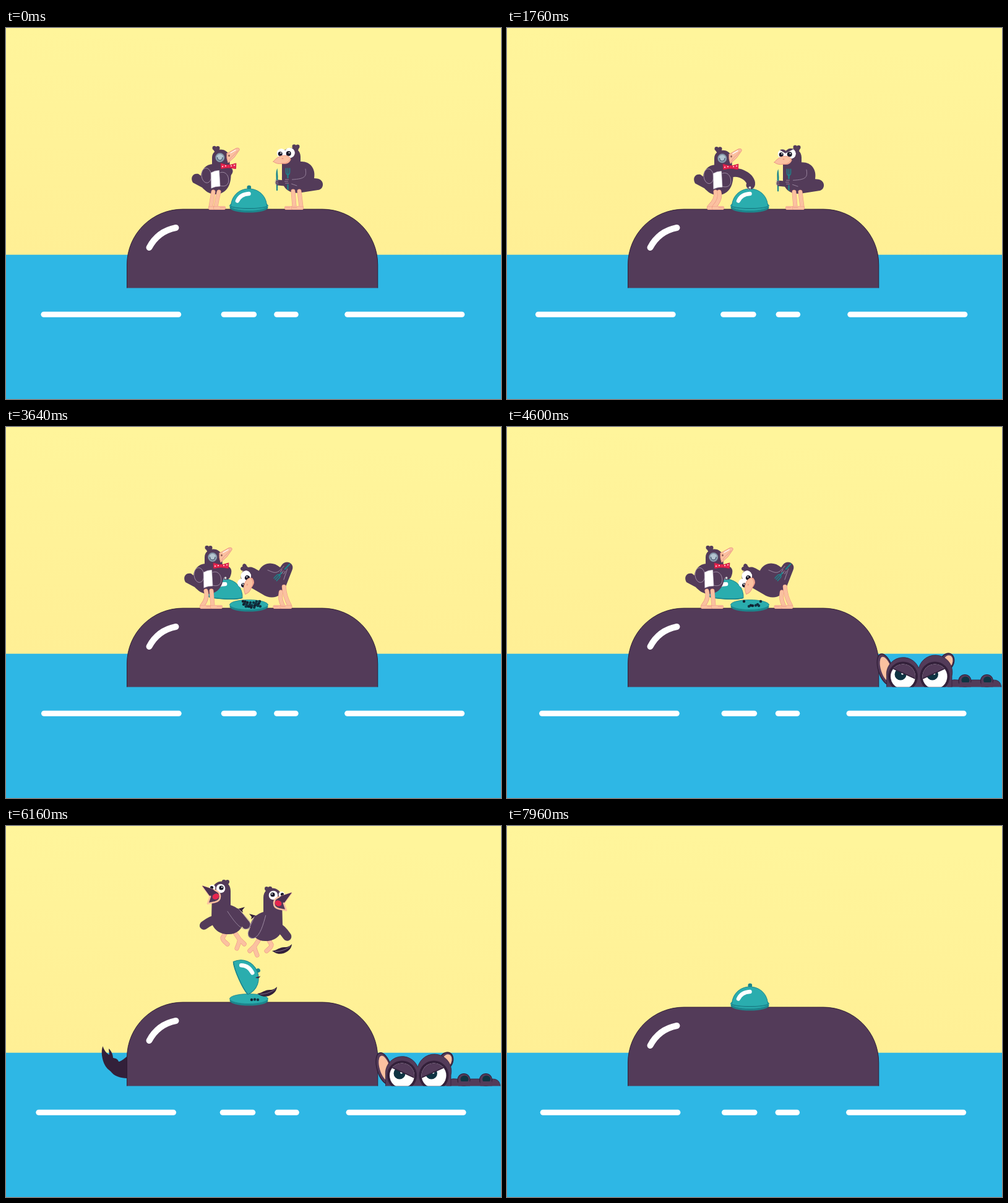
Recreate the animation shown at these times as an HTML page with a canvas. Size 800 by 600 pixels, loop 8000 ms.

```html
<!DOCTYPE html>
<html lang="en">
<head>
<meta charset="utf-8">
<title>Dinner on the island</title>
<style>
html, body { margin: 0; width: 100%; height: 100%; overflow: hidden; }
canvas { display: block; width: 800px; height: 600px; }
</style>
</head>
<body>
<canvas id="stage" width="800" height="600"></canvas>
<script>
const ctx = document.getElementById('stage').getContext('2d');
const LOOP = 8000, TAU = Math.PI * 2;
const PLUM = '#533b59', DARK = '#33203a', SKIN = '#fbc1a0', SKIN_EDGE = '#ec9a86';
const TEAL = '#2aadae', DEEP = '#1c858c', NAVY = '#0f3342', LINE = '#a795ac';
const WATERLINE = 420.5;
let t = 0;

const lerp = (a, b, k) => a + (b - a) * k;
const ramp = (a, b) => Math.min(1, Math.max(0, (t - a) / (b - a)));
const ease = (a, b) => { const k = ramp(a, b); return k * k * (3 - 2 * k); };
const easeOut = (a, b) => 1 - Math.pow(1 - ramp(a, b), 3);

function fill(d, color, edge, width = 0.8) {
  const p = new Path2D(d);
  ctx.fillStyle = color;
  ctx.fill(p);
  if (edge) { ctx.strokeStyle = edge; ctx.lineWidth = width; ctx.stroke(p); }
}
function line(d, color, width) {
  ctx.strokeStyle = color;
  ctx.lineWidth = width;
  ctx.stroke(new Path2D(d));
}
function edged(d, width) {
  line(d, SKIN_EDGE, width + 1.2);
  line(d, SKIN, width);
}
function oval(x, y, rx, ry, color, edge, width = 0.8, turn = 0) {
  ctx.beginPath();
  ctx.ellipse(x, y, rx, ry, turn, 0, TAU);
  ctx.fillStyle = color;
  ctx.fill();
  if (edge) { ctx.strokeStyle = edge; ctx.lineWidth = width; ctx.stroke(); }
}
const dot = (x, y, r, color, edge, width) => oval(x, y, r, r, color, edge, width);
function at(x, y, turn, draw) {
  ctx.save();
  ctx.translate(x, y);
  ctx.rotate(turn * Math.PI / 180);
  draw();
  ctx.restore();
}
function inCircle(x, y, r, draw) {
  ctx.save();
  ctx.beginPath();
  ctx.arc(x, y, r, 0, TAU);
  ctx.clip();
  draw();
  ctx.restore();
}

function backdrop() {
  const g = ctx.createLinearGradient(20, 0, 0, 367);
  g.addColorStop(0, '#fff59b');
  g.addColorStop(1, '#ffef95');
  ctx.fillStyle = g;
  ctx.fillRect(0, 0, 800, 367);
  ctx.fillStyle = '#2eb7e5';
  ctx.fillRect(0, 366.7, 800, 234);
}

function waves() {
  const s = Math.cos(TAU * (t - 280) / 3520);
  const bar = (x, w) => line(`M${x + 4.5},463.3 H${x + w - 4.5}`, '#fff', 9);
  bar(51.2 + 6 * s, 226.7);
  bar(346.4 + 1.4 * s, 57.5);
  bar(433.9 - 0.8 * s, 39.5);
  bar(548.8 - 1.7 * s, 194);
}

function hippoTail() {
  if (t > 5250 && t < 5900) {
    const up = 1 - easeOut(5250, 5620), swing = ease(5740, 5900);
    ctx.save();
    ctx.translate(60 * up, 80 * up);
    at(240, 350, -50 * swing, () => {
      ctx.translate(-240, -350);
      fill('M190,322 C184,300 205,285 222,285 C238,285 248,291 254,303 L236,312 C224,313 216,321 212,330Z', PLUM, DARK);
      fill('M213,319 C205,313 192,314 186,322 C178,332 174,342 177,350 L182,346 C181,354 184,361 187,362 L190,357 C189,366 192,374 197,380 L205,345Z', DARK);
    });
    ctx.restore();
  }
  if (t >= 5900 && t < 6650) {
    const out = ease(6300, 6600);
    ctx.save();
    ctx.translate(50 * out, 8 * out);
    fill('M199,370 C193,374 187,381 182,381 C180,376 177,376 173,375 C173,370 170,363 166,360 L167,370 C161,367 158,361 156.500,356 C153,364 155,378 160,387 C163,393 168,395 171,399 C178,407 190,408 199,408Z', DARK);
    ctx.restore();
  }
}

function island() {
  fill('M195.500,440 V383 C195.500,333 236,293 286,293 H511 C561,293 600.800,333 600.800,383 V440Z', PLUM, '#2b1a30', 0.9);
  line('M231.500,355 C240,339 254,327 274.500,323', '#fff', 10);
}

function ear(x, y, rx, ry, turn) {
  at(x, y, turn, () => {
    oval(0, 0, rx, ry, PLUM, DARK, 1.5);
    oval(1, 0, rx * 0.72, ry * 0.8, SKIN);
  });
}

function hippoEye(x, side) {
  dot(x, 403.5, 24, DARK);
  inCircle(x, 403.5, 20, () => {
    ctx.fillStyle = '#fff';
    ctx.fillRect(x - 22, 380, 44, 46);
    dot(x - 4, 400, 9.5, NAVY);
    dot(x - 1, 399, 1.8, '#fff');
    fill(`M${x - side * 24},387 L${x + side * 24},409 V375 H${x - side * 24}Z`, PLUM, DARK, 1.5);
  });
}

function hippo() {
  if (t < 4240 || t > 7400) return;
  const sink = 1 - easeOut(4240, 4560) + ease(6950, 7380);
  const twitch = Math.sin(t / 150);
  ctx.save();
  ctx.translate(0, 62 * sink);
  ear(611 - twitch, 392, 11.5, 26, -16 + twitch * 2);
  ear(711, 380, 11, 14.5, 24 + twitch * 2);
  fill('M706,440 L716,411 C722,407 728,410 736,409 H785 C795,409 799,413 799,425 V440Z', PLUM, DARK);
  for (const x of [740, 775.5]) {
    dot(x, 410.500, 10, PLUM, DARK, 1.2);
    oval(x + 1, 409.500, 6.5, 6, NAVY);
    fill(`M${x - 9},413 H${x + 10} V424 H${x - 9}Z`, PLUM);
  }
  fill('M613.500,440 V403 A27,27 0 0 1 665.500,390 A27,27 0 0 1 719,403 V440Z', PLUM, DARK);
  hippoEye(640, 1);
  hippoEye(691.5, -1);
  ctx.restore();
}

function plate() {
  oval(392.5, 290.5, 31, 8, DEEP);
  oval(392.5, 287.5, 31, 8, TEAL, DEEP, 0.8);
}

const LEFTOVERS = [[397, 289], [402, 288.5], [407, 289], [383, 282], [410, 282], [391, 290], [394, 288.5], [405, 287]];
function food() {
  const left = t < 4120 ? 28 : t < 4920 ? 8 : t < 5720 ? 5 : 3;
  for (let i = 0; i < left; i++) {
    const p = LEFTOVERS[i] || [383 + (i * 7.3) % 28, 281 + (i * 4.7) % 11];
    dot(p[0], p[1], 2.2, i % 3 ? NAVY : '#14202f');
  }
}

function lidPose() {
  if (t < 5880) {
    const k = ease(1800, 2500);
    return { x: lerp(392.5, 353, k), y: lerp(289, 275, k) - 22 * Math.sin(Math.PI * k), a: 3 * k };
  }
  if (t < 6160) {
    const k = ramp(5880, 6160);
    return { x: lerp(353, 379, k), y: lerp(275, 246, k) - 45 * Math.sin(Math.PI * k), a: lerp(3, 66, k) };
  }
  const k = ramp(6160, 6480), d = k * k;
  return { x: lerp(379, 392.5, k), y: lerp(246, 289, d), a: 66 * (1 - d) };
}

function lid(p) {
  at(p.x, p.y, p.a, () => {
    dot(0.3, -31, 3.4, DEEP);
    fill('M-29,0 C-29,-17 -16,-29 0,-29 C16,-29 29,-17 29,0 C18,4 -18,4 -29,0Z', TEAL, DEEP, 1);
    line('M-28,0 C-16,4 16,4 28,0', DEEP, 1.5);
    line('M-18.500,-9.500 C-15,-17 -9,-20.500 0,-21', '#fff', 6.5);
  });
}

function leg(hx, hy, kx, ky, ax, dir) {
  edged(`M${hx},${hy} Q${kx},${ky} ${ax},289`, 5.8);
  edged(`M${ax - dir},291 H${ax + dir * 13}`, 5);
  line(`M${ax + dir * 7},290.500 H${ax + dir * 14}`, SKIN_EDGE, 0.8);
}

function tuft(x, y) {
  dot(x - 2.8, y, 3.2, PLUM);
  dot(x + 2.8, y + 0.3, 3.2, PLUM);
  fill(`M${x - 5},${y + 2} L${x - 1},${y + 8} H${x + 3} L${x + 5},${y + 2}Z`, PLUM);
}

function bob() {
  return 0.6 * (1 - Math.cos(TAU * t / 1173)) * (1 - ease(2000, 2500));
}

function waiter(knob) {
  const reach = ease(1250, 1650), back = ease(1850, 2500);
  const dx = lerp(2 * reach, -12, back), dy = bob() + back;
  const step = reach * (1 - back);
  const foot1 = lerp(331 - 4 * reach, 317, back), foot2 = lerp(339 - 4 * reach, 334, back);

  ctx.save();
  ctx.translate(dx, dy);
  fill('M333,224 V210 C333,192 361,192 361,210 L362,224 C366,240 364,268 339,269 C328,269 322,263 317,258 L302,250 C297,241 303,234 311,236 L315,239 C316,228 324,221 333,220Z', PLUM);
  tuft(339.5, 194);
  ctx.restore();

  const sx = 358 + dx, sy = 234 + dy;
  const hx = lerp(348, knob.x + 1, reach), hy = lerp(246, knob.y + 1, reach);
  const c1 = sx + 8 + 0.3 * (hx - sx);
  line(`M${sx},${sy} C${c1},${sy - 6} ${hx + 4},${hy - 14} ${hx},${hy - 5}`, PLUM, 14);
  if (reach > 0.5) {
    line(`M${hx - 4},${hy - 1} l1,4 M${hx},${hy - 2} l0,4`, LINE, 0.8);
    dot(knob.x, knob.y, 1.8, '#d9e3dc');
  }

  leg(335 + dx, 265, lerp(333, 327, back) + 7 * step, 277, foot1, 1);
  leg(344 + dx - 3 * step, 265, 341 + lerp(5 * reach, -8, back), 277, foot2, 1);

  ctx.save();
  ctx.translate(dx, dy);
  fill('M357,203 L372,194.500 Q378,193 377,197.500 L369,209 L359,218 Q356,211 357,203Z', SKIN, SKIN_EDGE, 1);
  line('M361,214 C363,208 369,206 374,199', SKIN_EDGE, 1);
  oval(360.5, 206.5, 1.3, 1.8, '#8c5a50');
  line('M363,202 L371,197.500', '#fff', 1.4);
  dot(345.8, 209.5, 6.5, '#b4c5d0', '#8497a8', 2);
  line('M341.500,209.500 C342,215.500 349.500,215.500 350,209.500', '#42506a', 1.3);
  fill('M347.500,219 L358,222 L358,226 L348,227.500Z', '#e8264f', '#c91b45', 1);
  fill('M371.500,219 L361,222 L361,226 L371,227.500Z', '#e8264f', '#c91b45', 1);
  dot(359.5, 223.7, 2.6, '#e8264f', '#c91b45');
  for (const x of [350, 355, 364, 369]) dot(x, 222 + x % 3, 0.9, '#fff');
  oval(324, 238.5, 8, 12, PLUM, LINE, 0.9, -0.1);
  fill('M331.500,234 Q338,230 344.500,230.500 L346,256 Q338,256 332,259Z', '#fff', '#d8d4df', 0.6);
  line('M346,234 C356,230 362,242 359,251 C356,257 349,256 346,255', LINE, 0.9);
  ctx.restore();
}

function fork(px, py, hx, hy) {
  at(px, py, Math.atan2(hy - py, hx - px) * 180 / Math.PI, () => {
    line('M10,0 H34', DEEP, 2.2);
    line('M0,-3 H6 Q10,-3 10,0 Q10,3 6,3 H0 M0,0 H9', DEEP, 1.5);
  });
}

// side: 1 for the outer eye, -1 for the inner one; brow slants a lid over it.
function guestEye(x, y, r, side, brow, look) {
  inCircle(x, y, r, () => {
    dot(x, y, r, '#fff');
    dot(x - 1.8, y + 1 + 2.5 * look, r * 0.47, '#1c1a2b');
    dot(x - 0.8, y - 0.3 + 2.5 * look, 1, '#fff');
    const top = y - r - 1;
    fill(`M${x - side * r},${top} H${x + side * r} V${top + 9 * brow}Z`, PLUM);
  });
}

function pecking() {
  if (t < 3720) return 0;
  const d = Math.abs((t - 3720) % 800 - 400);
  return d < 300 ? 0.5 + 0.5 * Math.cos(Math.PI * d / 300) : 0;
}

function guest() {
  const lean = ease(2650, 3320), peck = pecking();
  const brow = ease(900, 1300) * (1 - ease(2400, 2700));
  const angle = -60 * lean - 24 * peck;
  const px = 465 - 22 * lean - 14 * peck, py = 262 + 3 * lean - 2 * peck + bob();

  at(px, py, angle, () => {
    ctx.translate(-465, -262);
    tuft(468.5, 191.5);
    fill('M446,222 V208 C446,189 476,189 476,208 V216 C491,215 501,227 498,243 L503,243.500 C515,245 515,261 504,262 L478,266 C455,270 445,256 446,240Z', PLUM);
    guestEye(445, 202.5, 7.5, 1, brow, lean);
    guestEye(458.5, 202, 8.5, -1, brow, lean);
    fill('M432,216 Q440,206 450,206 Q460,207 460,213 Q457,221 447,219 Q438,221 432,216Z', SKIN, SKIN_EDGE, 1);
    line('M446,219 C451,220 457,217 459,212', SKIN_EDGE, 1);
    oval(447, 211, 1.6, 1, SKIN_EDGE);
    if (lean < 0.5) {
      fill('M437,263 L436.500,240 Q436,231 438.500,227 L439.500,240 L439,263Z', DEEP);
      line('M450,251 L440,250', PLUM, 9);
      line('M435,246 l5,1 M434.500,249 l5,0.500 M435,252 l5,0', LINE, 0.8);
    }
    const fx = lerp(455.5, 477, lean), fy = lerp(227, 246, lean);
    const gx = lerp(455.5, 507, lean), gy = lerp(261, 253, lean);
    const mx = lerp(fx, gx, 0.62), my = lerp(fy, gy, 0.62);
    fork(fx, fy, gx, gy);
    line(`M484,228 C486,240 484,244 ${mx + 7},${my - 3} M${mx + 6},${my + 4} L${lerp(470, mx - 12, lean)},${lerp(255, 258, lean)}`, LINE, 0.8);
    oval(mx, my, lerp(4.5, 3, lean), lerp(5, 3.5, lean), PLUM);
    line(`M${mx - 4},${my - 3} h5 M${mx - 5},${my} h5 M${mx - 4},${my + 3} h5`, LINE, 0.8);
  });

  const r = angle * Math.PI / 180, c = Math.cos(r), s = Math.sin(r);
  [[-1, 2, 466], [9, 2, 477]].forEach(([x, y, ankle]) => {
    const hx = px + x * c - y * s, hy = py + x * s + y * c, ax = ankle - 18.5 * lean;
    const bend = 4 * lean * (1 - peck);
    leg(hx, hy, (hx + ax) / 2 - bend, (hy + 289) / 2, ax, -1);
  });
}

// Startled bird, facing left, centred on its body.
function flyer(x, y, flip, phase) {
  const flap = Math.sin((t - 6160) / 45 + phase) * 22, kick = Math.sin((t - 6160) / 55) * 14;
  ctx.save();
  ctx.translate(x, y);
  ctx.scale(flip, 1);
  at(-2, 19, kick, () => edged('M0,0 L-6,10 Q-6,14 2,20', 6));
  at(11, 19, -kick, () => edged('M0,0 L8,12 Q9,15 4,27 M8,12 L16,20', 6));
  at(-15, -2, flap, () => line('M0,0 C-7,1 -14,4 -23,11', PLUM, 14));
  fill('M17,-18 L28,-21 L24,-16 L25,-12Z', DARK);
  fill('M-25,-45 C-25,-68 5,-68 5,-47 V-24 C18,-20 27,-10 26,2 C24,16 14,23 2,23 C-14,24 -27,12 -26,-2Z', PLUM);
  tuft(-3, -62);
  at(14, -12, -flap, () => {
    line('M0,0 L16,20', PLUM, 14);
    line('M-14,-2 C-6,10 4,26 15,27 C23,26 25,18 19,11 L4,-6', LINE, 0.8);
  });
  oval(-24.5, -52, 5, 5, '#fff');
  dot(-25.5, -52.5, 2.6, '#1c1a2b');
  dot(-11, -51, 7.3, '#fff');
  dot(-10, -52, 3.6, '#1c1a2b');
  dot(-9, -53, 1, '#fff');
  fill('M-40,-54.500 L-24,-49 Q-12,-47 -12,-38 Q-12,-31 -20,-29 L-32,-26.500 L-28,-38Z', PLUM, SKIN, 2.6);
  oval(-19, -38, 5.5, 4.5, '#e8264f', null, 0, -0.4);
  fill('M-41,-55.500 L-24,-50 L-17,-44 L-29,-39Z', '#4a3050');
  ctx.restore();
}

function flyers() {
  if (t < 5880 || t > 6950) return;
  const up = easeOut(5880, 6120), k = ramp(6330, 6900), off = 300 * k * k;
  flyer(lerp(405, 421, up), lerp(240, 163, up) - off, -1, -1);
  flyer(lerp(338, 358, up), lerp(238, 152, up) - off, 1, 0);
}

function feathers() {
  if (t < 5960 || t > 7400) return;
  const age = t - 6160;
  ctx.globalAlpha = 1 - ramp(6900, 7400);
  [[430, 202, 0.055, 1], [406, 271, 0.012, 1], [403, 245, 0.045, 0.25]].forEach(([x, y, v, size]) => {
    at(x + 6 * Math.sin(age / 260), y + v * age, 10 * Math.sin(age / 260), () => {
      ctx.scale(size, size);
      fill('M0,0 C8,-1 12,-6 20,-6 C26,-6 29,-8 32,-11 C31,2 14,8 5,3Z', DARK);
      line('M5,1 C14,1 22,-2 29,-7', LINE, 0.7);
    });
  });
  ctx.globalAlpha = 1;
}

function draw() {
  t = performance.now() % LOOP;
  ctx.lineCap = ctx.lineJoin = 'round';
  backdrop();

  const lift = -8 * ease(5850, 5970) * (1 - ease(6300, 6560));
  ctx.save();
  ctx.beginPath();
  ctx.rect(0, 0, 800, WATERLINE);
  ctx.clip();
  hippoTail();
  ctx.save();
  ctx.translate(0, lift);
  island();
  ctx.restore();
  hippo();
  ctx.restore();

  ctx.save();
  ctx.translate(0, lift);
  plate();
  if (t > 1800 && t < 6480) food();
  ctx.restore();

  const pose = lidPose(), a = pose.a * Math.PI / 180;
  if (t >= 6480) pose.y += lift;
  lid(pose);
  if (t < 5880) {
    waiter({ x: pose.x + 31 * Math.sin(a), y: pose.y - 31 * Math.cos(a) });
    guest();
  }
  flyers();
  feathers();
  waves();
  requestAnimationFrame(draw);
}
draw();
</script>
</body>
</html>
```
